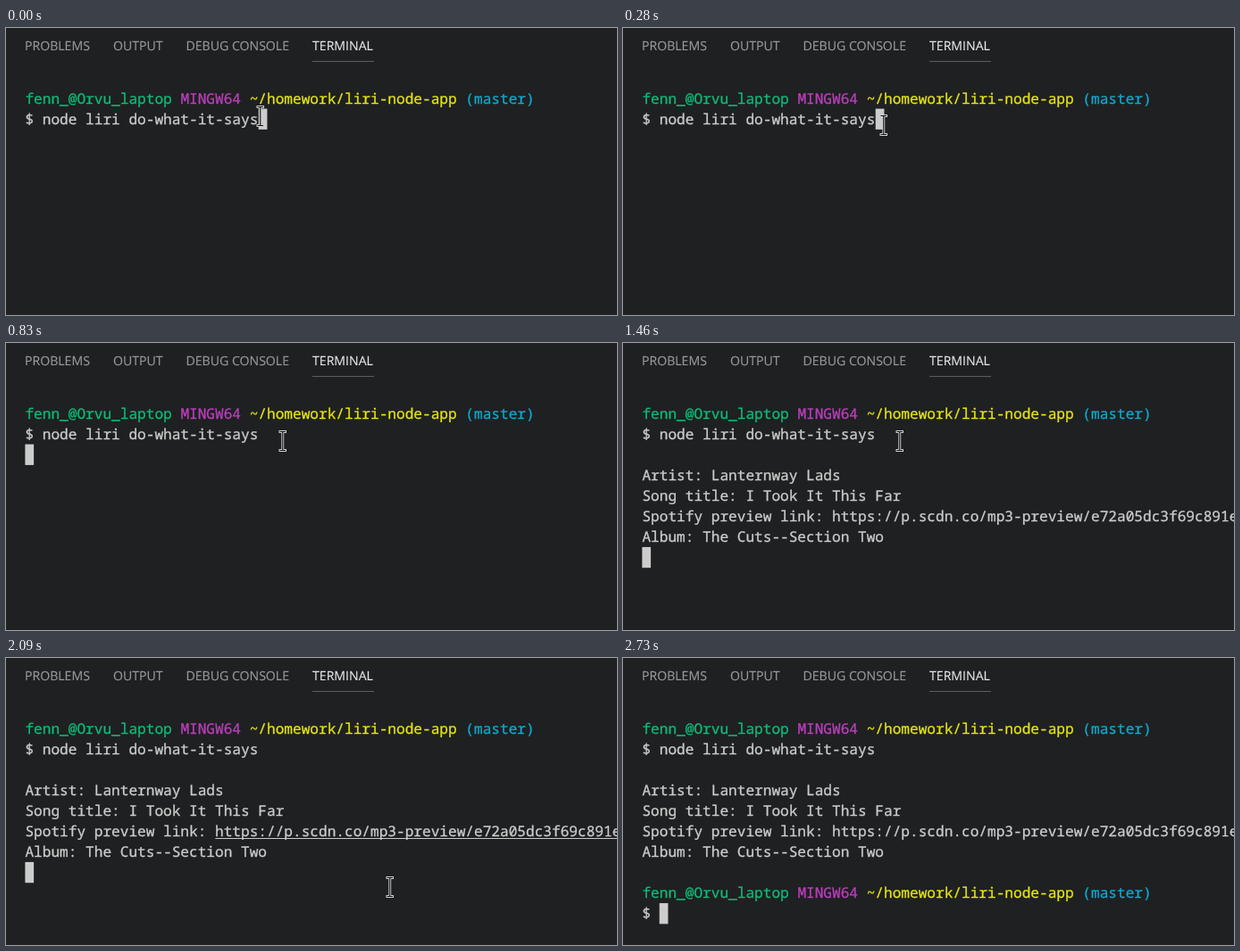
An HTML page that plays this animation: 684 by 322 pixels, repeating every 2.95 s.

```html
<!DOCTYPE html>
<html lang="en">
<head>
<meta charset="utf-8">
<title>Terminal</title>
<style>
  html, body { margin: 0; width: 100%; height: 100%; overflow: hidden; background: #1f2022; }
  svg { display: block; width: 684px; height: 322px; }
  text { white-space: pre; text-rendering: geometricPrecision; }
  .tabs { font: 14.1px "Open Sans", "Noto Sans", sans-serif; fill: #989999; stroke: #989999; stroke-width: .15px; }
  .tabs .on { fill: #e7e7e7; stroke: #e7e7e7; }
  .term { font: 16.13px "Noto Sans Mono", "DejaVu Sans Mono", monospace; stroke-width: .3px; }
  .plain { fill: #ccc; stroke: #ccc; }
  .user { fill: #0dbc79; stroke: #0dbc79; }
  .sys { fill: #bc3fbc; stroke: #bc3fbc; }
  .path { fill: #e5e510; stroke: #e5e510; }
  .branch { fill: #11a8cd; stroke: #11a8cd; }
</style>
</head>
<body>
<svg viewBox="0 0 684 322">
  <g class="tabs">
    <text x="21" y="24.7">PROBLEMS</text>
    <text x="120" y="24.7">OUTPUT</text>
    <text x="201.5" y="24.7">DEBUG CONSOLE</text>
    <text class="on" x="343" y="24.7">TERMINAL</text>
  </g>
  <rect x="343" y="37" width="69" height="1" fill="#5c5d5e"/>
  <g class="term">
    <g id="command"></g>
    <g id="result"></g>
    <g id="done"></g>
  </g>
  <rect id="underline" y="202" height="1" fill="#ccc"/>
  <rect id="block" width="9.7" height="23.3" fill="#ccc"/>
  <g id="pointer">
    <path fill="#d0d0d0" d="M-4.5-12h8.5v3h-2.8v18h2.8v3h-8.5v-3h2.8v-18h-2.8z"/>
    <path fill="#111" d="M-3.5-11h6.5v1h-2.7v20h2.7v1h-6.5v-1h2.7v-20h-2.7z"/>
  </g>
</svg>
<script>
const LOOP = 2950, LEFT = 21.4, TOP = 67.5, CELL = 9.678, ROW = 23.06;
const ENTER = 440, RESULT = 1460, LEAVE = 2160, DONE = 2730;

const $ = id => document.getElementById(id);
const colX = col => LEFT + col * CELL;
const rowY = row => TOP + row * ROW;

function add(parent, name, attrs, content = '') {
  const el = document.createElementNS('http://www.w3.org/2000/svg', name);
  for (const key in attrs) el.setAttribute(key, attrs[key]);
  el.textContent = content;
  return parent.appendChild(el);
}

const print = (group, row, content) =>
  add($(group), 'text', { class: 'plain', x: LEFT, y: Math.round(rowY(row) + 17.2) }, content);

function prompt(group, row) {
  const line = print(group, row);
  const parts = [
    ['user', 'fenn_@Orvu_laptop '],
    ['sys', 'MINGW64 '],
    ['path', '~/homework/liri-node-app '],
    ['branch', '(master)']
  ];
  for (const [cls, content] of parts) add(line, 'tspan', { class: cls }, content);
}

prompt('command', 0);
print('command', 1, '$ node liri do-what-it-says');
print('result', 3, 'Artist: Lanternway Lads');
print('result', 4, 'Song title: I Took It This Far');
print('result', 5, 'Spotify preview link: https://p.scdn.co/mp3-preview/e72a05dc3f69c891e');
print('result', 6, 'Album: The Cuts--Section Two');
prompt('done', 8);
print('done', 9, '$');

$('underline').setAttribute('x', colX(22));
$('underline').setAttribute('width', 684 - colX(22));

// The pointer is only sampled at these times; between them it holds still.
const ticks = [0, 60, 130, 210, 280, 350, 440, 520, 590, 670, 750, 830, 1990, 2090];
const path = [[0, 285, 99], [280, 292, 109], [520, 299, 113], [830, 310, 110],
              [1980, 310, 110], [1990, 361, 128], [2090, 430, 257]];

function pointerAt(time) {
  const t = ticks.filter(v => v <= time).pop();
  const i = Math.max(1, path.findIndex(p => p[0] >= t));
  const [t0, x0, y0] = path[i - 1], [t1, x1, y1] = path[i];
  const k = (t - t0) / (t1 - t0);
  return [Math.round(x0 + (x1 - x0) * k), Math.round(y0 + (y1 - y0) * k)];
}

function blockCell(t) {
  if (t < ENTER) return [27, 1];
  if (t < RESULT) return [0, 2];
  return t < DONE ? [0, 7] : [2, 9];
}

const show = (id, on) => { $(id).style.display = on ? '' : 'none'; };

function draw(t) {
  show('result', t >= RESULT);
  show('done', t >= DONE);
  show('underline', t >= 2090 && t < LEAVE);
  show('pointer', t < LEAVE);
  const [col, row] = blockCell(t);
  $('block').setAttribute('x', colX(col));
  $('block').setAttribute('y', rowY(row));
  $('pointer').setAttribute('transform', `translate(${pointerAt(t)})`);
}

const start = performance.now();
function frame() {
  draw((performance.now() - start) % LOOP);
  requestAnimationFrame(frame);
}
frame();
</script>
</body>
</html>
```
